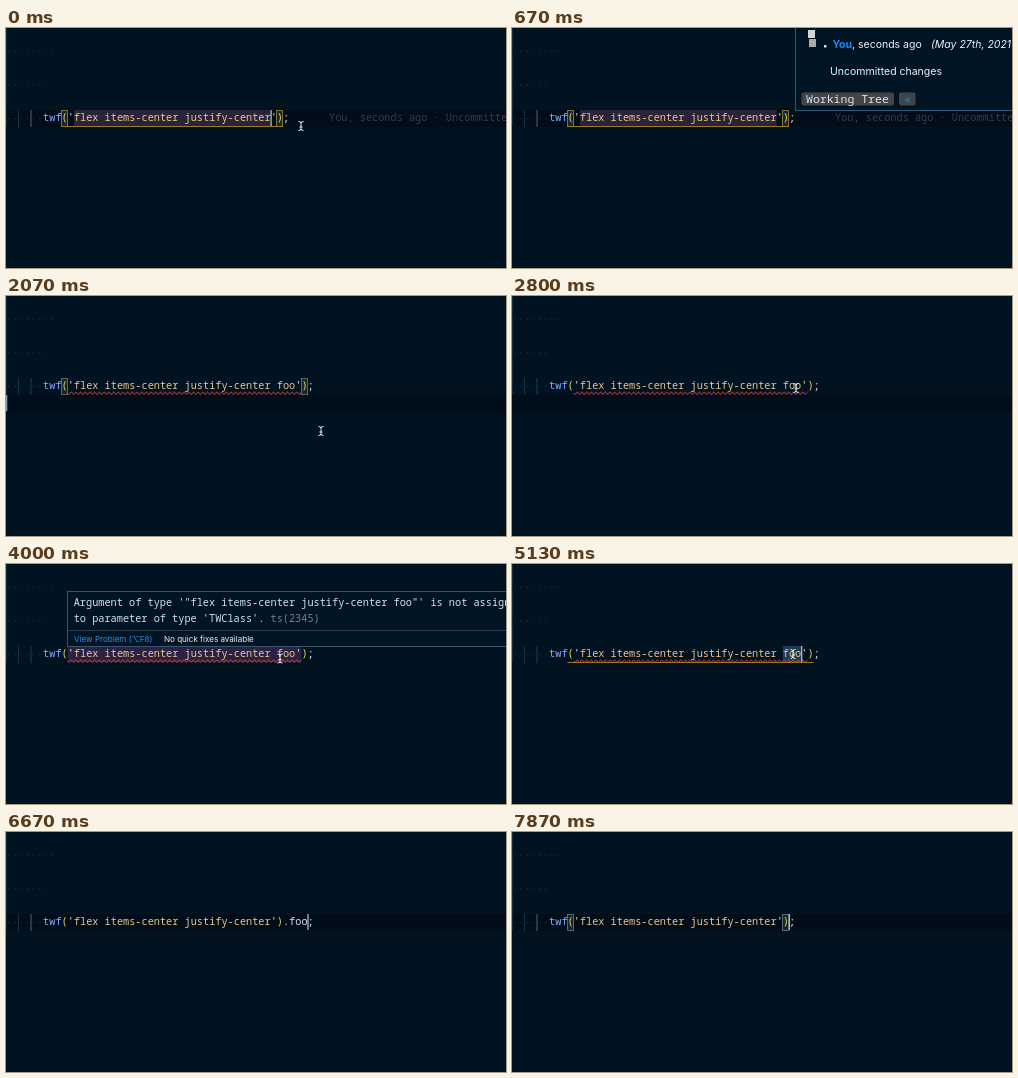
These frames come from a looping animation (500x240 px, 7.94 s). An HTML page with a canvas:

```html
<!DOCTYPE html>
<html lang="en">
<head>
<meta charset="utf-8">
<style>
  html, body { margin: 0; width: 100%; height: 100%; overflow: hidden; background: #011321; }
  canvas { display: block; width: 500px; height: 240px; }
</style>
</head>
<body>
<canvas width="500" height="240"></canvas>
<script>
const LOOP = 7940, CHAR = 6.15, LEFT = 37.1, ROW = 82, ROW_H = 17;
const mono = (size = 10.25) => `500 ${size}px "Noto Sans Mono", monospace`;
const sans = (size, style = '') => `${style} ${size}px Inter, "Liberation Sans", sans-serif`;
const ctx = document.querySelector('canvas').getContext('2d');

// Pointer tracks: [time, x, y]; the pointer is hidden between tracks.
const tracks = [
  [[0, 295, 98], [70, 295, 98], [270, 312, 94]],
  [[1730, 300, 98], [2000, 315, 135], [2200, 315, 135], [2530, 296, 106], [2800, 284, 92],
   [3400, 283, 90], [3650, 266, 85], [3950, 274, 94.5], [4200, 274, 94.5], [4500, 281, 90], [5250, 281, 90]]
];

const during = (t, from, to) => t >= from && t < to;
const smooth = u => u * u * (3 - 2 * u);
const colX = col => LEFT + col * CHAR;

function rect(x, y, w, h, color) {
  ctx.fillStyle = color;
  ctx.fillRect(x, y, w, h);
}

function frame(x, y, w, h, color) {
  ctx.strokeStyle = color;
  ctx.lineWidth = 1;
  ctx.strokeRect(x + .5, y + .5, w - 1, h - 1);
}

function text(str, x, y, color, font = mono()) {
  ctx.font = font;
  ctx.fillStyle = color;
  ctx.fillText(str, x, y);
  return x + ctx.measureText(str).width;
}

function chip(x, y, w, h) {
  ctx.fillStyle = '#414548';
  ctx.beginPath();
  ctx.roundRect(x, y, w, h, 2);
  ctx.fill();
}

// Number of characters present, given the times at which each is added or removed.
const countAt = (t, added, removed) =>
  added.filter(a => t >= a).length - removed.filter(r => t >= r).length;

function stringTail(t) {
  if (t >= 5250) return t < 5450 ? ' ' : '';
  return ' foo'.slice(0, countAt(t, [800, 940, 1070, 1200], []));
}

function callTail(t) {
  const n = countAt(t, [6470, 6540, 6600, 6670, 6740, 6800], [6940, 7000, 7040, 7080, 7140, 7200]);
  return '.foo()'.slice(0, n);
}

function squiggle(from, to) {
  ctx.strokeStyle = '#e8453f';
  ctx.lineWidth = 1;
  ctx.beginPath();
  for (let x = from; x <= to; x += .4) ctx.lineTo(x, 97.2 + 1.2 * Math.sin((x - from) * 2 * Math.PI / 4.7));
  ctx.stroke();
}

function drawBackground(lineBelow, showBand) {
  rect(0, 0, 500, 240, '#011321');
  if (showBand) rect(0, lineBelow ? 99 : ROW, 500, ROW_H, '#010e19');
  rect(0, 0, 1, 98, '#0c2b41');
  for (const [y, count] of [[22.5, 8], [56.5, 6], [90, 6]])
    for (let i = 0; i < count; i++) rect(2.4 + i * CHAR, y, 1.2, 1.2, '#1b3342');
  rect(12, ROW, 1, ROW_H, '#153344');
  rect(24.5, ROW, 1, ROW_H, lineBelow || !showBand ? '#1d3f52' : '#50636f');
}

function drawCode(t, lineBelow, selecting, errorOpen) {
  const body = 'flex items-center justify-center' + stringTail(t);
  const tail = callTail(t);
  const quote = 5 + body.length, close = quote + 1;

  if (t < 800) rect(colX(5), ROW, colX(quote) - colX(5), 16, '#2a2438');
  if (errorOpen) rect(colX(4), ROW, colX(close) - colX(4), 16, '#2a2145');
  if (selecting) rect(colX(quote - 3), ROW, 3 * CHAR, 16, '#1d3b53');

  const boxed = !tail && !during(t, 2130, 4500) && !selecting;
  const scope = t < 1400 || during(t, 4500, 6130);
  if (boxed) {
    for (const col of [3, close]) {
      const x = Math.round(colX(col) - .5);
      rect(x, ROW, 7, 16, '#16262c');
      frame(x, ROW, 7, 17, scope ? '#7d7435' : '#59646b');
    }
  }
  if (scope) rect(colX(3), 98, colX(close + 1) - colX(3), 1, '#9a7a25');
  if (during(t, 1400, 6130)) squiggle(colX(4), colX(close));

  const y = 93;
  text('twf', colX(0), y, '#82aaff');
  text('(', colX(3), y, '#f0d25c');
  text("'", colX(4), y, '#d9f5dd');
  text(body, colX(5), y, '#ecc48d');
  text("'", colX(quote), y, '#d9f5dd');
  text(')', colX(close), y, '#f0d25c');
  text(tail + ';', colX(close + 1), y, '#d6deeb');
  if (t < 800) text('You, seconds ago · Uncommitted changes', 323, y, '#303d47');

  if (lineBelow) {
    if ((t - 2060) % 1000 < 500) rect(0, 99, 1.3, 16, '#80a4c2');
    return;
  }
  const blinkOff = during(t, 400, 800) || during(t, 1700, 2060) || during(t, 7270, 7730);
  if (blinkOff) return;
  const col = t < 6070 ? quote : t < 6200 ? close : close + 1 + tail.length;
  rect(colX(col) - .2, ROW, 1.3, 16, '#a9bccb');
}

function drawBlamePopup() {
  rect(283, 0, 217, 83, '#011424');
  rect(283, 0, 1, 83, '#2b5878');
  rect(283, 82, 217, 1, '#2b5878');
  rect(296, 2, 7, 8, '#d5d5d2');
  rect(297, 11, 7, 8, '#a9aaa9');
  rect(312, 17, 2.5, 2.5, '#d6deeb');
  const x = text('You', 320.5, 20, '#1b8cf0', sans(10.5, 'bold'));
  text(', seconds ago', x, 20, '#eef2f6', sans(10.5));
  text('(May 27th, 2021 9:41am)', 419, 20, '#eef2f6', sans(10.5, 'italic'));
  text('Uncommitted changes', 318, 47, '#eef2f6', sans(10.5));
  chip(289.5, 64.5, 92.5, 13);
  text('Working Tree', 294, 75, '#dde3ea', mono(11.5));
  chip(387, 64.5, 16.5, 13);
  text('«', 392, 74.5, '#1b8cf0', mono(11.5));
}

function drawErrorPopup() {
  rect(61, 27, 439, 56, '#011424');
  rect(61, 27, 1, 56, '#35566b');
  rect(61, 27, 439, 1, '#35566b');
  rect(61, 82, 439, 1, '#35566b');
  rect(62, 66, 438, 1, '#24404f');
  text(`Argument of type '"flex items-center justify-center foo"' is not assignable`, 67.7, 42, '#d6deeb');
  const x = text("to parameter of type 'TWClass'. ", 67.7, 58, '#d6deeb');
  text('ts(2345)', x, 58, '#77838d');
  text('View Problem (⌥F8)', 68, 78, '#2f8fe8', sans(8.05));
  text('No quick fixes available', 158, 78, '#f2f5f8', sans(8.05));
}

function drawPointer(t) {
  const track = tracks.find(p => during(t, p[0][0], p[p.length - 1][0]));
  if (!track) return;
  const i = track.findIndex(p => p[0] > t);
  const [t0, x0, y0] = track[i - 1], [t1, x1, y1] = track[i];
  const u = smooth((t - t0) / (t1 - t0));
  const x = x0 + (x1 - x0) * u, y = y0 + (y1 - y0) * u;
  ctx.strokeStyle = '#e8edf0';
  ctx.lineWidth = 1;
  ctx.beginPath();
  for (const s of [-1, 1]) {
    ctx.moveTo(x - 2.5, y + s * 4.5);
    ctx.quadraticCurveTo(x, y + s * 4.5, x, y + s * 3);
    ctx.quadraticCurveTo(x, y + s * 4.5, x + 2.5, y + s * 4.5);
  }
  ctx.moveTo(x, y - 4);
  ctx.lineTo(x, y + 4);
  ctx.moveTo(x - 1.5, y + 1);
  ctx.lineTo(x + 1.5, y + 1);
  ctx.stroke();
}

function draw(now) {
  const t = now % LOOP;
  const lineBelow = during(t, 2060, 4500);
  const selecting = during(t, 4670, 5250);
  const errorOpen = during(t, 3000, 4400);
  drawBackground(lineBelow, !selecting && !errorOpen);
  drawCode(t, lineBelow, selecting, errorOpen);
  if (during(t, 270, 800)) drawBlamePopup();
  if (errorOpen) drawErrorPopup();
  drawPointer(t);
  requestAnimationFrame(draw);
}
requestAnimationFrame(draw);
</script>
</body>
</html>
```
